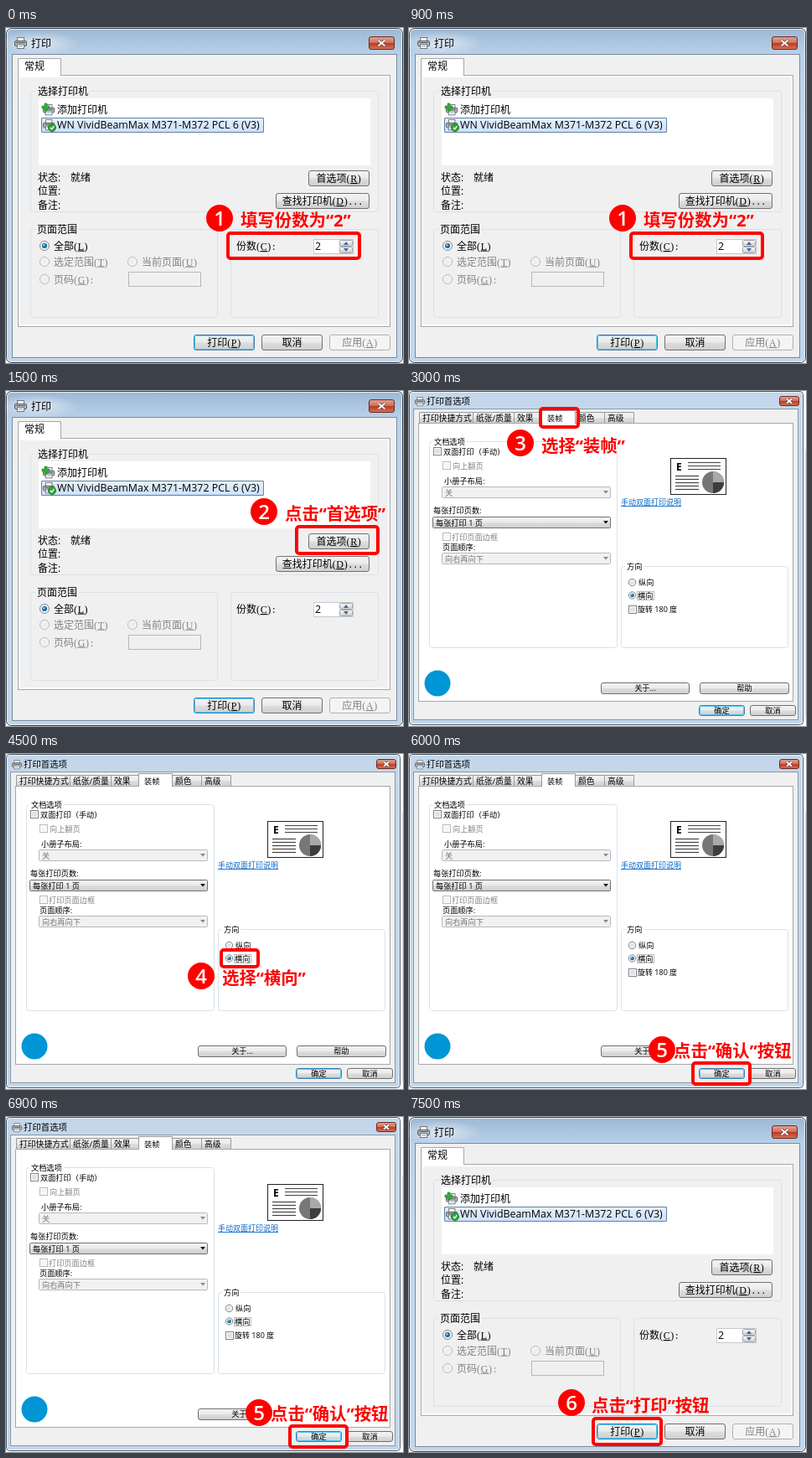
An HTML page for the animation above (8 s loop, 474 px wide and 400 px high).

```html
<!DOCTYPE html>
<html lang="zh-CN">
<head>
<meta charset="utf-8">
<title>打印设置步骤</title>
<style>
html, body { margin: 0; width: 100%; height: 100%; overflow: hidden; background: #fff; }
svg { display: block; width: 100vw; height: 100vh; }
text { font-family: "Open Sans", "Noto Sans CJK SC", "Noto Sans CJK", sans-serif; white-space: pre; }
.hotkey { font-family: "Liberation Serif", serif; font-size: 12px; letter-spacing: .6px; }
.tail { font-family: "Liberation Mono", monospace; font-size: 10px; }
.key { text-decoration: underline; }
.step text { fill: #f00; font-weight: 700; }
.step .digit { fill: #fff; font-weight: 600; font-size: 24px; text-anchor: middle; }
</style>
</head>
<body>
<svg id="stage" viewBox="0 0 474 400" xmlns="http://www.w3.org/2000/svg">
  <defs>
    <linearGradient id="glass" x2="0" y2="1">
      <stop offset="0" stop-color="#9db8d4"/><stop offset=".08" stop-color="#b9d1ea"/><stop offset=".3" stop-color="#c3d6ea"/>
    </linearGradient>
    <radialGradient id="glow">
      <stop offset="0" stop-color="#fff" stop-opacity=".6"/><stop offset="1" stop-color="#fff" stop-opacity="0"/>
    </radialGradient>
    <linearGradient id="face" x2="0" y2="1">
      <stop offset="0" stop-color="#f3f3f3"/><stop offset=".48" stop-color="#ebebeb"/>
      <stop offset=".52" stop-color="#dddddd"/><stop offset="1" stop-color="#cfcfcf"/>
    </linearGradient>
    <linearGradient id="red" x2="0" y2="1">
      <stop offset="0" stop-color="#e3a598"/><stop offset=".48" stop-color="#cf6d58"/>
      <stop offset=".52" stop-color="#bb3a20"/><stop offset="1" stop-color="#d2765a"/>
    </linearGradient>
    <linearGradient id="chosen" x2="0" y2="1">
      <stop offset="0" stop-color="#e6f1fd"/><stop offset="1" stop-color="#cbe1fb"/>
    </linearGradient>
  </defs>
</svg>
<script>
const GRAY = '#838383';
const STEP_MS = 1500, LOOP_MS = 8000;

// Boxes are given by their outer edges; the one-pixel line lies just inside.
const box = (l, t, r, b, fill = 'none', line = '#d5d9dd', rx = 0) =>
  `<rect x="${l + .5}" y="${t + .5}" width="${r - l - 1}" height="${b - t - 1}" rx="${rx}" fill="${fill}" stroke="${line}"/>`;
const fillBox = (l, t, r, b, fill) =>
  `<rect x="${l}" y="${t}" width="${r - l}" height="${b - t}" fill="${fill}"/>`;
const dottedBox = (l, t, r, b, line) =>
  `<rect x="${l + .5}" y="${t + .5}" width="${r - l - 1}" height="${b - t - 1}" fill="none" stroke="${line}" stroke-dasharray="1 1"/>`;
const path = (d, fill, line = 'none', width = 1) =>
  `<path d="${d}" fill="${fill}" stroke="${line}" stroke-width="${width}"/>`;
const disc = (x, y, r, fill, line = 'none') =>
  `<circle cx="${x}" cy="${y}" r="${r}" fill="${fill}" stroke="${line}"/>`;
const text = (x, y, size, content, fill = '#000', extra = '') =>
  `<text x="${x}" y="${y}" font-size="${size}" fill="${fill}" ${extra}>${content}</text>`;
const hotkey = (letter, tail = '') =>
  `<tspan class="hotkey">(<tspan class="key">${letter}</tspan>)</tspan><tspan class="tail">${tail}</tspan>`;

function button(l, t, r, b, size, label, state = '') {
  const line = { main: '#3c7fb1', off: '#adb2b5' }[state] || '#707070';
  const glow = state === 'main' ? box(l + 1, t + 1, r - 1, b - 1, 'none', '#48c9f2', 2) : '';
  return box(l, t, r, b, state === 'off' ? '#f4f4f4' : 'url(#face)', line, 2.5) + glow +
    text((l + r) / 2, (t + b) / 2 + size * .37, size, label, state === 'off' ? GRAY : '#000', 'text-anchor="middle"');
}

function group(l, t, r, b, size, title, titleX, paper) {
  const caption = title
    ? fillBox(titleX - 2, t - 2, titleX + size * title.length + 2, t + 3, paper) + text(titleX, t + size * .4, size, title)
    : '';
  return box(l, t, r, b, 'none', '#d9e2e8', 3) + caption;
}

function radio(x, y, r, checked, off) {
  return disc(x, y, r, '#f6f6f6', off ? '#b8b8b8' : '#7c8590') +
    disc(x, y, r * .62, off ? '#eeeeee' : '#dfe5ea') +
    (checked ? disc(x, y, r * .55, '#176b9f') + disc(x - .7, y - .8, r * .22, '#8fdcf4') : '');
}

const checkbox = (x, y, off) =>
  box(x, y, x + 10, y + 10, '#fff', off ? '#b9b9b9' : '#7f8489') +
  fillBox(x + 2, y + 2, x + 8, y + 8, off ? '#f5f5f5' : '#dfe3e7');

const combo = (l, t, r, b, label, off) =>
  box(l, t, r, b, off ? '#f1f1f1' : 'url(#face)', off ? '#b5b9bd' : '#707070', 1) +
  text(l + 4, b - 3, 9.2, label, off ? '#777' : '#000') +
  path(`M${r - 9} ${t + 5}h6l-3 3.5z`, off ? '#888' : '#111');

const printerIcon = (x, y, scale = 1) => `<g transform="translate(${x} ${y}) scale(${scale})">` +
  box(3, 0, 12, 7, '#fff', '#777') + box(0, 4, 15, 11, '#b7bdc2', '#555', 1.5) +
  fillBox(2, 6, 13, 7, '#555') + box(3, 8, 12, 14, '#fff', '#777') + fillBox(5, 10, 10, 11, '#6aa3cf') + '</g>';

function closeButton(l, t, r, b) {
  const x = (l + r) / 2, y = (t + b) / 2, s = (b - t) * .2;
  const cross = `M${x - s * 1.2} ${y - s}l${s * 2.4} ${s * 2}m0 ${-s * 2}l${-s * 2.4} ${s * 2}`;
  return box(l, t, r, b, 'url(#red)', '#6b2a22', 2.5) +
    path(cross, 'none', '#5f3a38', 3.4) + path(cross, 'none', '#fff', 2);
}

function printDialog() {
  const option = (x, y, label, letter, checked, tail) =>
    radio(x, y, 5.5, checked, !checked) +
    text(x + 11, y + 4.5, 12, label + hotkey(letter, tail), checked ? '#000' : GRAY);
  return [
    box(0, 0, 474, 400, 'url(#glass)', '#3d4650', 6),
    box(1, 1, 473, 399, 'none', '#e4f0fa', 5),
    '<ellipse cx="38" cy="18" rx="50" ry="14" fill="url(#glow)"/>',
    printerIcon(10, 11), text(30, 23, 12, '打印'),
    closeButton(433, 10, 464, 26),
    box(7, 31, 467, 394, '#f0f0f0', '#7c8b9a'),

    box(14, 56, 459, 357, '#fff', '#a2a8ae'),
    fillBox(17, 59, 456, 354, '#f0f0f0'),
    path('M14.5 57V36.5H65.5V57', '#fff', '#a2a8ae'),
    text(22, 50, 12, '常规'),

    group(29, 75, 445, 220, 12, '选择打印机', 38, '#f0f0f0'),
    fillBox(39, 84, 435, 164, '#fff'),
    printerIcon(44, 91, .95),
    path('M43 93h3v-3h3v3h3v3h-3v3h-3v-3h-3z', '#35ad36', '#19801f', .6),
    text(61, 102, 12, '添加打印机'),
    box(42, 107, 308, 125, 'url(#chosen)', '#7da2ce', 2),
    dottedBox(42, 107, 308, 125, '#445b78'),
    printerIcon(44, 109, .95),
    disc(55, 119, 4.5, '#32a836', '#1c7d25'),
    path('M53 119l1.6 1.8 2.8-3.6', 'none', '#fff', 1.3),
    text(61, 120, 12.4, 'WN VividBeamMax M371-M372 PCL 6 (V3)'),

    text(38, 183, 12, '状态:'), text(77, 183, 12, '就绪'),
    text(38, 199, 12, '位置:'), text(38, 216, 12, '备注:'),
    button(361, 170, 434, 189, 12, '首选项' + hotkey('R')),
    button(322, 197, 434, 216, 12, '查找打印机' + hotkey('D', '...')),

    group(29, 240, 253, 346, 12, '页面范围', 37, '#f0f0f0'),
    option(46, 260, '全部', 'L', true),
    option(46, 279, '选定范围', 'T'),
    option(151, 279, '当前页面', 'U'),
    option(46, 300, '页码', 'G', false, ':'),
    box(146, 291, 233, 309, '#f0f0f0', '#b5b9bd'),

    group(268, 240, 445, 346, 12),
    text(275, 265, 12, '份数' + hotkey('C', ':')),
    box(367, 252, 415, 270, '#fff', '#c4c9ce'),
    text(369, 265, 12.5, '2'),
    box(398, 253, 414, 261, 'url(#face)', '#a0a6ad', 1),
    box(398, 261, 414, 269, 'url(#face)', '#a0a6ad', 1),
    path('M403 259l3-4 3 4zM403 263l3 4 3-4z', '#456797'),

    button(224, 366, 297, 385, 12, '打印' + hotkey('P'), 'main'),
    button(305, 366, 378, 385, 12, '取消'),
    button(386, 366, 459, 385, 12, '应用' + hotkey('A'), 'off'),
  ].join('');
}

function previewPage() {
  const lines = (x, y, width, count) => Array.from({ length: count }, (_, i) =>
    path(`M${x} ${y + i * 4}h${width}`, 'none', '#444', 1.2)).join('');
  return box(312, 80, 379, 124, '#fff', '#222') +
    text(319, 95, 12, 'E', '#000', 'font-weight="700"') +
    lines(333, 85.5, 39, 3) + lines(318, 101.5, 28, 5) +
    disc(363, 109, 13, '#777') +
    path('M363 109V96A13 13 0 0 1 376 109z', '#a9a9a9') +
    path('M363 109H376A13 13 0 0 1 363 122z', '#3d3d3d');
}

function preferencesDialog() {
  const small = (x, y, label, fill) => text(x, y, 9.2, label, fill);
  const tabs = [[12, 76, '打印快捷方式'], [76, 125, '纸张/质量'], [125, 159, '效果'],
    [198, 233, '颜色'], [233, 268, '高级'], [158, 198, '装帧']];
  return [
    fillBox(0, 0, 474, 400, '#fff'),
    box(0, 0, 471, 399, '#c3d6ea', '#4a5562', 4),
    box(1, 1, 470, 398, 'none', '#edf5fc', 3),
    fillBox(472, 70, 474, 390, '#e4e8ec'),
    printerIcon(7, 7, .8), text(21, 16, 10.4, '打印首选项'),
    closeButton(442, 6, 466, 18),
    box(5, 21, 465, 393, '#f0f0f0', '#8a98a7'),

    box(11, 38, 459, 371, '#fff', '#a2a8ae'),
    ...tabs.map(([l, r, label], i) => {
      const active = i === tabs.length - 1;
      return path(`M${l + .5} 39V${active ? 23.5 : 25.5}H${r + .5}V39`, active ? '#fff' : 'url(#face)', '#969ba1') +
        text(l + (active ? 7 : 4), 35.5, active ? 9.2 : 9.8, label);
    }),
    path('M12 38.5H158M199 38.5H458', 'none', '#a2a8ae'),

    group(24, 60, 249, 307, 9.2, '文档选项', 30, '#fff'),
    checkbox(29, 67), small(41, 76, '双面打印（手动）'),
    checkbox(40, 84, true), small(52, 93, '向上翻页', GRAY),
    small(42, 111, '小册子布局:'),
    combo(39, 114, 241, 128, '关', true),
    small(29, 146, '每张打印页数:'),
    combo(28, 150, 241, 164, '每张打印 1 页'),
    checkbox(40, 169, true), small(51, 178, '打印页面边框', GRAY),
    small(40, 190, '页面顺序:'),
    combo(39, 193, 241, 207, '向右再向下', true),

    previewPage(),
    text(253, 136, 9, '手动双面打印说明', '#0067c5', 'text-decoration="underline"'),

    group(253, 209, 453, 307, 9.2, '方向', 260, '#fff'),
    radio(266.5, 228.5, 4.2), small(274, 232, '纵向'),
    radio(266.5, 244, 4.2, true), small(273, 248, '横向'),
    dottedBox(272, 239, 293, 250, '#777'),
    checkbox(262, 256), text(273, 264, 9, '旋转 180 度'),

    disc(34, 349, 15.5, '#0096d6'),
    button(229, 348, 335, 362, 9.2, '关于...'),
    button(347, 348, 454, 362, 9.2, '帮助'),
    button(346, 375, 401, 388, 9.2, '确定', 'main'),
    button(407, 375, 462, 388, 9.2, '取消'),
  ].join('');
}

// frame: centre line of the red box; cover: blank area under the caption.
const steps = [
  { dialog: 0, frame: [265, 245, 422, 275], badge: [255, 227], caption: '填写份数为“2”', at: [280, 237] },
  { dialog: 0, frame: [347, 162, 444, 194], badge: [308, 144], caption: '点击“首选项”', at: [333, 154] },
  { dialog: 1, frame: [157, 21, 202, 43], badge: [133, 62], caption: '选择“装帧”', at: [158, 73] },
  { dialog: 1, frame: [257, 234, 301, 254], badge: [233, 265], caption: '选择“横向”', at: [258, 275], cover: [258, 255, 360, 282] },
  { dialog: 1, frame: [339, 369, 407, 394], badge: [302, 353], caption: '点击“确认”按钮', at: [316, 362], cover: [300, 341, 457, 368] },
  { dialog: 0, frame: [220, 360, 301, 391], badge: [194, 341], caption: '点击“打印”按钮', at: [218, 352] },
];

function stepMarks({ frame: [l, t, r, b], badge: [x, y], caption, at, cover }, index) {
  return `<g class="step">` + (cover ? fillBox(...cover, '#fff') : '') +
    `<rect x="${l}" y="${t}" width="${r - l}" height="${b - t}" rx="3" fill="none" stroke="#f00" stroke-width="4"/>` +
    disc(x, y, 16, '#f00') + `<text class="digit" x="${x}" y="${y + 8.5}">${index + 1}</text>` +
    text(...at, 20.4, caption) + '</g>';
}

const stage = document.getElementById('stage');
stage.insertAdjacentHTML('beforeend',
  [printDialog(), preferencesDialog()].map(d => `<g class="dialog">${d}</g>`).join('') + steps.map(stepMarks).join(''));
const dialogs = stage.querySelectorAll('.dialog');
const marks = stage.querySelectorAll('.step');

const start = performance.now();
function draw() {
  const current = Math.floor((performance.now() - start) % LOOP_MS / STEP_MS);
  const show = (nodes, shown) => nodes.forEach((node, i) => { node.style.display = i === shown ? '' : 'none'; });
  show(dialogs, steps[current].dialog);
  show(marks, current);
  requestAnimationFrame(draw);
}
draw();
</script>
</body>
</html>
```
